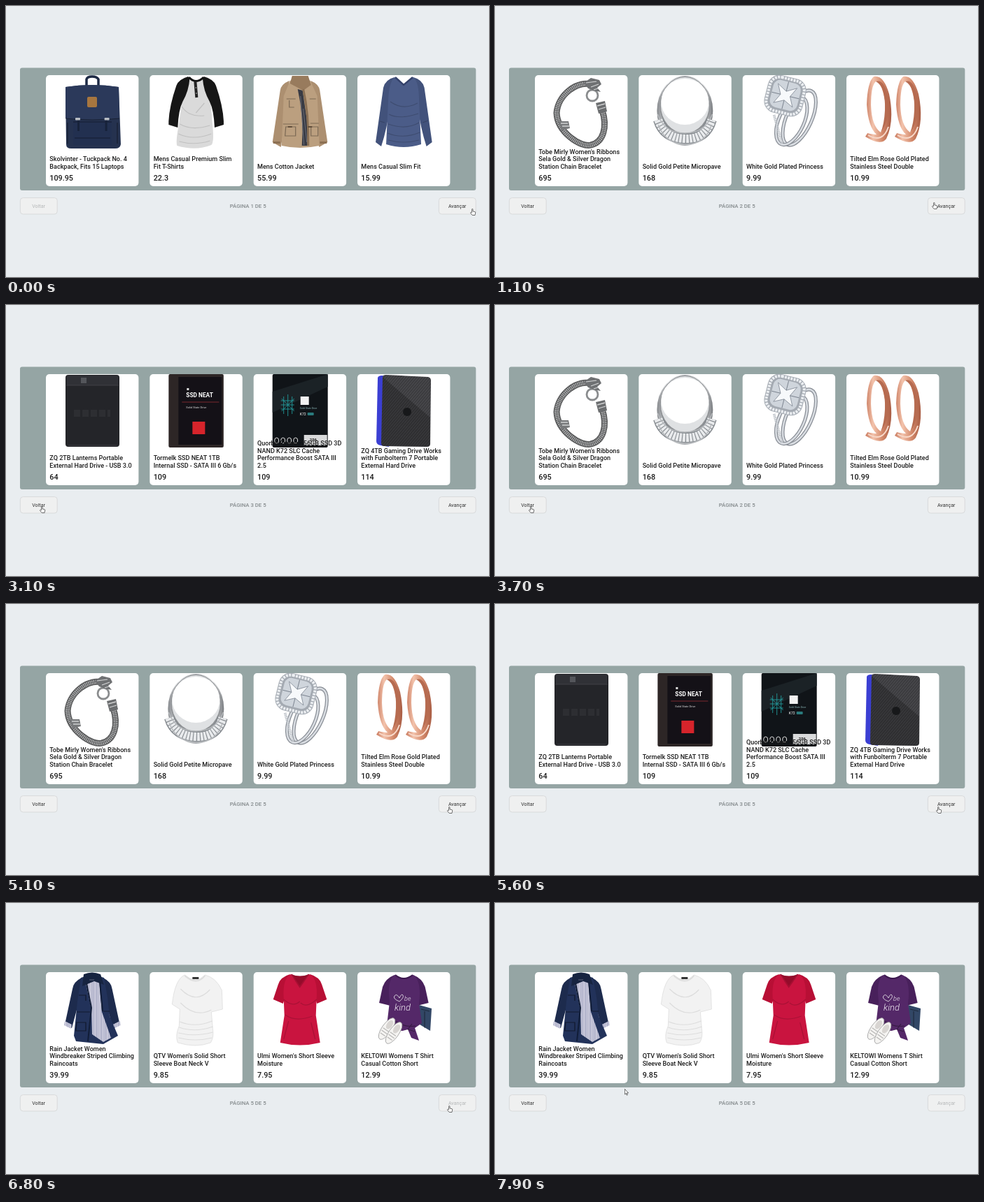
Write an HTML page that moves like this. It is 690 by 388 pixels and loops after 8 s.

```html
<!DOCTYPE html>
<html lang="pt">
<head>
<meta charset="utf-8">
<title>Carrossel de produtos</title>
<style>
  html, body { margin: 0; width: 100%; height: 100%; overflow: hidden; background: #e9edf0; }
  svg { display: block; overflow: hidden; font-family: Roboto, sans-serif; }
  .title, .price { font-weight: 500; fill: #1c1c1c; }
  .title { font-size: 9.05px; }
  .price { font-size: 10.8px; }
  .nav { font-size: 7.1px; fill: #333; text-anchor: middle; }
  .off { fill: #b5b7b8; }
  .count { font-size: 7.8px; font-weight: 500; fill: #858b8d; text-anchor: middle; }
  .pages, .cursor, .hand, .arrow { animation: 8s step-end infinite; }
  .pages { animation-name: pages; }
  .cursor { animation-name: move; }
  .hand { animation-name: hand; }
  .arrow { animation-name: arrow; }
  @keyframes pages {
    0% { transform: translateY(0); }
    12.5%, 46.25% { transform: translateY(-388px); }
    22.5%, 70% { transform: translateY(-776px); }
    76.25% { transform: translateY(-1164px); }
    85%, 100% { transform: translateY(-1552px); }
  }
  /* The pointer advances once every 100 ms while it travels. */
  @keyframes move {
    0% { transform: translate(663px, 290px); }
    1.25% { transform: translate(663px, 290px); animation-timing-function: steps(3, start); }
    5% { transform: translate(624px, 281px); }
    23.75% { transform: translate(624px, 281px); animation-timing-function: steps(4, start); }
    28.75% { transform: translate(196px, 238px); }
    32.5% { transform: translate(196px, 238px); animation-timing-function: steps(6, start); }
    40% { transform: translate(48px, 288px); }
    47.5% { transform: translate(48px, 288px); animation-timing-function: steps(6, start); }
    55% { transform: translate(441px, 305px); }
    57.5% { transform: translate(441px, 305px); animation-timing-function: steps(6, start); }
    65% { transform: translate(630px, 290px); }
    91.25% { transform: translate(630px, 290px); animation-timing-function: steps(3, start); }
    95% { transform: translate(219px, 265px); }
    98.75%, 100% { transform: translate(185px, 266px); }
  }
  @keyframes hand {
    0%, 37.5%, 63.75% { opacity: 1; }
    23.75%, 47.5%, 91.25%, 100% { opacity: 0; }
  }
  @keyframes arrow {
    0%, 37.5%, 63.75% { opacity: 0; }
    23.75%, 47.5%, 91.25%, 100% { opacity: 1; }
  }
</style>
</head>
<body>
<svg width="690" height="388" viewBox="0 0 690 388">
  <defs>
    <linearGradient id="silver">
      <stop offset="0" stop-color="#85888c"/><stop offset=".2" stop-color="#eceef0"/>
      <stop offset=".5" stop-color="#a6a9ad"/><stop offset=".8" stop-color="#f2f3f4"/>
      <stop offset="1" stop-color="#777a7e"/>
    </linearGradient>
    <linearGradient id="rose">
      <stop offset="0" stop-color="#c8795d"/><stop offset=".3" stop-color="#f3c3ac"/>
      <stop offset=".65" stop-color="#d48a6c"/><stop offset="1" stop-color="#a85c43"/>
    </linearGradient>
    <linearGradient id="sky" x2="0" y2="1">
      <stop offset="0" stop-color="#4d6fa6"/><stop offset=".35" stop-color="#c9c6d4"/>
      <stop offset=".5" stop-color="#7a6a86"/><stop offset="1" stop-color="#30482b"/>
    </linearGradient>
    <pattern id="weave" width="3" height="3" patternUnits="userSpaceOnUse" patternTransform="rotate(40)">
      <rect width="3" height="3" fill="#3b3b3e"/><rect width="1" height="3" fill="#4c4c50"/>
    </pattern>
    <pattern id="stripes" width="2.4" height="4" patternUnits="userSpaceOnUse">
      <rect width="2.4" height="4" fill="#d3d3e2"/><rect width=".8" height="4" fill="#8f93b4"/>
    </pattern>
  </defs>
  <rect width="690" height="388" fill="#e9edf0"/>
  <rect x="20" y="88.5" width="651.3" height="175.5" rx="3" fill="#95a5a4"/>
  <g fill="#eff0f0" stroke="#d3d5d6" stroke-width=".8">
    <rect x="20.4" y="274.6" width="52.8" height="23.4" rx="4"/>
    <rect x="618.4" y="274.6" width="52.8" height="23.4" rx="4"/>
  </g>
  <g class="pages" id="pages"></g>
  <g class="cursor" fill="#fff" stroke="#333" stroke-width=".7" stroke-linejoin="round">
    <path class="hand" d="M2.6 5.8V1.2Q2.6.4 3.3.4T4 1.2V4L7 4.6Q7.9 4.9 7.7 5.8L7 9.5H3.2L.6 6.4Q.5 5.2 1.4 5.3Z"/>
    <path class="arrow" d="M.4.4V8L2.1 6.5 3.3 9.2 4.4 8.7 3.2 6H5.6Z"/>
  </g>
</svg>
<script>
const path = (d, fill = 'none', stroke = 'none', w = 1, more = '') =>
  `<path d="${d}" fill="${fill}" stroke="${stroke}" stroke-width="${w}" ${more}/>`;
const rect = (x, y, w, h, fill, rx = 0, more = '') =>
  `<rect x="${x}" y="${y}" width="${w}" height="${h}" rx="${rx}" fill="${fill}" ${more}/>`;
const oval = (x, y, rx, ry, fill, more = '') =>
  `<ellipse cx="${x}" cy="${y}" rx="${rx}" ry="${ry}" fill="${fill}" ${more}/>`;
const text = (x, y, str, more = '') => `<text x="${x}" y="${y}" ${more}>${str}</text>`;
const label = (x, y, size, fill, str, weight = 400) =>
  text(x, y, str, `font-size="${size}" fill="${fill}" font-weight="${weight}"`);
const group = (transform, s) => `<g transform="${transform}">${s}</g>`;
const both = s => s + group('translate(132.6 0) scale(-1 1)', s);
const folds = (d, alpha = .2) => path(d, 'none', `rgba(0,0,0,${alpha})`, 1.2);

const backpack = () =>
  path('M58 16V6Q59 2 66 2T75 6V16', 'none', '#1c2944', 3.5) +
  path('M28 17Q66 11 104 17L107 99Q106 105 99 105H36Q29 105 29 99Z', '#25324f') +
  path('M28 17Q66 11 104 17L105 62Q66 66 28 62Z', '#2b395a') +
  rect(39, 66, 55, 34, '#223050', 2) +
  folds('M28 62Q66 66 105 62M39 67H94M41 90H92M31 68V98M102 68V98', .4) +
  both(rect(45, 64, 3, 16, '#17223a') + rect(42, 61, 7, 3.5, '#b9bec4', 1)) +
  rect(59, 31, 14, 15, '#a7763f', 2);

const raglan = () =>
  path('M54 3Q66 12 79 3Q81 24 87 38L90 74Q92 96 88 100Q66 109 39 101Q37 95 41 74L46 38Q53 22 54 3Z', '#dadada') +
  both(path('M55 2Q41 6 38 15Q28 44 27 66V71L40 75Q41 50 47 38Q56 22 57 5Z', '#161616')) +
  path('M56 3Q66 14 77 3', 'none', '#111', 3) + path('M65 9L67 32', 'none', '#222', 4) +
  oval(66, 18, .8, .8, '#ccc') + oval(66.6, 26, .8, .8, '#ccc') +
  folds('M46 45Q55 60 78 58M43 70Q60 80 86 72M41 84Q62 94 88 84M42 95Q65 101 86 94M78 40L66 54', .12);

const fieldJacket = () =>
  both(path('M51 8Q39 13 38 22L27 96L39 103L48 50Z', '#ac8f70') + rect(28, 95, 10, 3, '#8c7053')) +
  path('M52 8L66 3L81 8L91 30L94 101Q66 107 40 101L43 30Z', '#bb9f7f') +
  path('M55 1L78 1L82 14L71 22L52 12Z', '#987b5d') +
  path('M63 20L70 22L77 70L77 101L69 101Q72 60 63 20Z', '#393b44') +
  path('M67 30L72 100M71 48L76 96', 'none', '#777985', .8) +
  path('M71 20Q79 55 78 101', 'none', '#8b7054', 3) +
  folds('M47 34H60M80 34H89M42 70H64M81 69H93M46 74H60V87H45ZM82 74H92V87H82ZM51 36V46H58', .35) +
  both(rect(49, 73, 6, 2, '#604d3a'));

const sweater = () =>
  both(path('M53 3Q40 6 37 18L26 96L34 102Q42 78 47 43Z', '#42527b')) +
  path('M53 3L66 14L80 3Q88 10 88 36L91 99Q66 107 41 99L44 36Q45 10 53 3Z', '#4b5c88') +
  path('M54 3L66 14L79 3', 'none', '#33416a', 2.4) +
  folds('M47 38Q65 51 86 40M45 56Q60 64 87 55M44 70Q69 79 88 68M43 83Q65 92 89 82M44 93Q66 99 88 93M32 66L39 68M93 68L101 65', .18);

const bracelet = () => {
  const band = 'M84 14C61 6 33 28 31 54C32 82 66 104 80 100C98 96 104 74 96 50';
  return path(band, 'none', '#58595a', 9) + path(band, 'none', '#b9babb', 6, 'stroke-dasharray="1.3 1.2"') +
    path(band, 'none', '#6d6e70', .9) +
    oval(82, 29, 8, 8, 'none', 'stroke="#8a8c8e" stroke-width="2.8"') +
    path('M70 11L80 4L92 7L95 13L89 18L94 24L84 22L76 19Z', '#6f7173') +
    path('M73 11L88 9M80 17L91 13M84 21L90 19', 'none', '#d6d7d8', 1.2) +
    path('M34 66L48 66L50 76L38 79Z', '#77797b') + path('M87 40L100 37L103 52L91 55Z', '#6b6d6f') +
    path('M37 69H47M39 73H49M89 44L100 41M91 49L101 46', 'none', '#d0d1d2', 1.3);
};

const bandRing = () =>
  oval(66, 51, 40, 50, 'url(#silver)') +
  oval(66, 44, 36, 42, '#8f9295') + oval(66, 43, 34.5, 40, '#dfe1e3') +
  oval(66, 38, 34, 33, '#fff') +
  path('M28 64Q36 90 66 91T104 64', 'none', '#858a8f', 15) +
  path('M28 64Q36 90 66 91T104 64', 'none', '#e9ebed', 12, 'stroke-dasharray="3.6 1.1"') +
  path('M27 56Q37 83 66 83T105 56M28 71Q37 98 66 99T104 71', 'none', '#b7babd', 1.5);

const haloRing = () => {
  const hoop = (x, y, rx, ry) => oval(x, y, rx, ry, 'none', `transform="rotate(24 ${x} ${y})" stroke="#868b93" stroke-width="5"`) +
    oval(x, y, rx, ry, 'none', `transform="rotate(24 ${x} ${y})" stroke="#d9dde2" stroke-width="2.6"`);
  return hoop(81, 61, 18, 42) + hoop(70, 65, 18, 37) +
    path('M45 57L56 98', 'none', '#c0c5cb', 4, 'stroke-dasharray="1.6 .8"') +
    group('rotate(14 61 29)',
      rect(33, 2, 56, 55, '#a4aab2', 17) +
      rect(36, 5, 50, 49, 'none', 14, 'stroke="#eceff2" stroke-width="4" stroke-dasharray="3 1.3"') +
      rect(41, 9, 40, 40, '#cfd5dc', 10) +
      path('M47 15L61 23L75 15L68 29L75 43L61 36L47 43L54 29Z', '#f7f9fb', '#858d98', .8) +
      path('M41 29H54M68 29H81M61 9V23M61 36V49', 'none', '#7d8590', 1));
};

const roseHoops = () => {
  const hoop = path('M39 2Q53 -1 61 27Q69 66 57 91Q49 102 27 88L30 83Q39 85 43 85Q31 74 29 42Q30 10 39 2Z', 'url(#rose)') +
    path('M42 9Q50 8 55 37Q58 66 49 82Q36 73 35 43Q35 15 42 9Z', '#fff') +
    path('M42 9Q56 16 55 50Q54 70 49 82Q64 61 59 31Q54 5 42 9Z', '#b66b50') +
    path('M31 86Q52 98 60 74', 'none', '#f8dacb', 2);
  return hoop + group('translate(42 0)', hoop);
};

const plainDrive = () =>
  rect(28, 1, 77, 103, '#242529', 4) + rect(29.5, 2, 74, 14, '#303136', 3) +
  path('M29 16H104M32 102H101', 'none', '#44464b', .8) + rect(50, 5, 8, 8, '#54565b') +
  path('M40 56H92', 'none', '#2d2e32', 10, 'stroke-dasharray="9 3"');

const redDrive = () =>
  rect(27, 0, 78.5, 105, '#2d2626', 2) + rect(41, 4, 62, 97, '#141117') +
  rect(53, 20, 3, 3, '#ddd') + label(52, 33, 8.3, '#fff', 'SSD NEAT', 700) +
  path('M46 40H99', 'none', '#963036', .8) + label(52, 49, 4, '#ddd', 'Solid State Drive') +
  rect(61, 68, 18, 18, '#d6242b');

const tealDrive = () =>
  rect(27, 0, 79, 105, '#101418', 2) +
  path('M27 25L106 0V18L27 55Z', '#1b2226') +
  group('translate(49 44)', both('').replace(/./g, '') +
    path('M-10 -6H9M-10 0H9M-10 6H9M-6 -12V13M0 -15V16M6 -12V13M-9 -9L9 9M9 -9L-9 9', 'none', '#239a9c', .9)) +
  rect(67, 32, 12, 12, '#f2f2f2') + label(66, 50, 3.4, '#8cb8b9', 'Solid State Drive') +
  label(66, 59, 5.2, '#fff', 'K72') + rect(77, 55, 9, 4, '#2a7b7d', 1) +
  rect(72, 87, 33, 15, '#d9dadb') + label(80, 96, 6, '#222', '256', 700) +
  [33, 42, 51, 60].map(x => oval(x, 95, 3, 4, 'none', 'stroke="#ddd"')).join('');

const blueDrive = () =>
  path('M29 5Q30 2 35 2L50 4L45 104L33 102Q27 101 27 96Z', '#3b3fd3') +
  path('M36 4Q36 1 41 1L101 4Q105 5 105 9L104 100Q104 104 99 104L38 103Q34 103 34 99Z', 'url(#weave)') +
  path('M36 4L104 62L104 100Q104 104 99 104L38 103Q34 103 34 99Z', 'rgba(0,0,0,.22)') +
  oval(71, 54, 6, 6, '#17181a');

const monitor = () =>
  path('M60 84H73L75 99Q82 100 82 104H51Q51 100 58 99Z', '#111') +
  rect(26, 0, 80, 84, '#111', 1) + rect(28.5, 2, 75, 76, 'url(#sky)') +
  path('M28 15Q48 3 66 15T103 10V2H28Z', '#6b86ad') + oval(46, 14, 9, 5, '#fff3cf') +
  path('M28 36L43 21L56 34L75 17L103 36V49H28Z', '#5b536f') +
  path('M28 39Q50 29 66 42T103 37V78H28Z', '#45632e') +
  path('M28 50L51 46L64 66L84 48L103 56V78H28Z', '#28391f') +
  path('M61 41Q47 51 62 54T61 65Q49 69 44 78H86Q72 71 71 62T67 49Z', '#dce1e6') +
  path('M80 39Q91 33 101 43M31 43L43 41', 'none', '#84963c', 4);

const curvedMonitor = () =>
  path('M59 84L72 74L82 83L87 88L66 84L60 104L52 93L80 88', 'none', '#26272a', 2.5) +
  path('M27 1Q66 10 105.5 15Q107 48 104 72Q66 75 28 91Z', '#0d1016') +
  path('M29 4Q66 12 103.5 17Q105 47 102 69Q66 73 30 86Z', '#151d25') +
  path('M29 24L68 46L102 33V69Q66 73 30 86Z', '#1b2b34') +
  path('M57 44Q64 37 69 48L72 64L79 75H52L54 59Z', '#05080b') +
  path('M60 47L66 50M55 61L64 59M68 57L73 65', 'none', '#758891', 1) +
  group('translate(76 39) rotate(7)', ['QLED', 'GAMING', 'MONITOR'].map((s, i) => label(0, i * 6.5, 5.8, '#fff', s, 700)).join(''));

const hooded = (fill, dark, light) =>
  both(path('M50 16Q39 18 37 30L27 92L37 101Q44 79 47 50Z', fill)) +
  path('M48 16L66 9L85 16L88 48L94 99Q66 108 39 99L45 48Z', fill) +
  path('M50 18Q48 4 60 1H73Q84 4 83 18Q75 25 66 24T50 18Z', dark) +
  path('M55 16Q57 5 66 5T78 16L67 23Z', light) +
  folds('M66 21V102M45 47Q55 57 65 51M88 47Q77 57 67 51M40 94Q66 101 93 94M31 71L42 74M102 71L91 74M49 73L45 86M83 73L88 86', .45);

const snowJacket = () => hooded('#421a6d', '#30114f', '#582c85') +
  rect(75, 34, 8, 2, '#b9a8cc') + path('M67 24V102', 'none', '#2b1046', 1.6) +
  both(path('M27 89L39 93', 'none', '#251039', 3));

const bikerJacket = () => hooded('#303236', '#1c1d1f', '#43454a') +
  path('M55 21L66 40L78 21L85 36L69 52L66 101L63 52L48 36Z', '#222327', '#696b70', .7) +
  folds('M33 48L46 53M99 48L87 53M29 82L40 87M104 82L92 87', .7) +
  path('M72 49L66 101M48 63L56 75M84 63L78 75', 'none', '#85878b', .8);

const raincoat = () =>
  both(path('M51 8Q39 14 38 24L27 75L37 80L47 43Z', '#1d2b4d') + path('M27 70L37 75L36 81L26 76Z', 'url(#stripes)')) +
  path('M50 8L66 3L83 8L88 36L91 63L103 91L82 103L43 99L40 91L45 42Z', '#22325a') +
  path('M56 12L76 11L80 57L93 94L82 100L66 89L65 54Z', 'url(#stripes)') +
  path('M54 3Q66 -2 78 3L83 18L69 13L52 20Z', '#172440') +
  rect(62, 10, 7, 2, '#39425c') +
  path('M58 16L65 51L60 99', 'none', '#111d37', 2) + path('M77 14L81 56', 'none', '#111d37', 2) +
  folds('M44 57H63M82 56H91M44 72H57V84H43ZM47 33H57V41', .5);

const whiteTee = () =>
  path('M50 4Q66 18 79 4Q95 8 103 26L104 53L88 57L90 81Q92 93 87 101Q66 109 40 101Q36 91 42 77L43 53L32 46Q36 10 50 4Z', '#f2f2f2', '#dedede', .8) +
  path('M50 5Q67 20 79 5', 'none', '#ddd', 2) + rect(61, 7, 9, 3, '#333') +
  folds('M44 24Q66 47 86 25M44 44Q65 66 88 54M43 71Q65 80 89 70M42 79Q65 87 90 78M41 87Q65 93 90 86M41 94Q65 100 89 94', .09);

const redTee = () =>
  both(path('M52 3Q38 7 35 18L28 39L42 45L48 28Z', '#b80f35')) +
  path('M53 3L66 21L80 3Q92 9 90 38L89 62L95 101Q66 108 38 101L44 62L43 38Q41 9 53 3Z', '#c9143f') +
  path('M54 3L66 21L79 3Q66 8 54 3Z', '#940c2b') + path('M54 3L66 21L79 3', 'none', '#a60f32', 2) +
  folds('M43 39Q56 51 66 42M90 39Q76 52 67 44M45 61Q60 72 84 63M50 70L43 96M82 72L88 96', .16);

const knottedTee = () => {
  const shoe = group('rotate(35 42 81)', oval(42, 81, 7, 18, '#f5f4f2', 'stroke="#aaa" stroke-width=".9"') +
    oval(42, 74, 4, 7, '#d8d5d2') + folds('M37 83H47M37 87H47M38 91H46', .25));
  return path('M88 47L106 52L104 84L89 75Z', '#324766') + folds('M91 53L103 56M96 56V80', .4) +
    both(path('M53 4Q40 9 36 21L31 44L47 48L50 30Z', '#48205b')) +
    path('M53 4Q66 13 80 4Q92 13 88 45L92 73L82 80L88 98L77 94L72 82Q56 88 42 76L46 42Q42 12 53 4Z', '#542868') +
    path('M54 4Q66 14 79 4', 'none', '#3b184d', 2) +
    path('M60 37Q56 30 53 34T60 42Q67 36 65 33T60 37Z', 'none', '#eee', .8) +
    text(67, 41, 'be', 'font-size="9" fill="#f1ebf3" font-weight="300" font-style="italic"') +
    text(53, 55, 'kind', 'font-size="13" fill="#f1ebf3" font-weight="300" font-style="italic"') +
    folds('M48 65Q64 80 83 77M78 74L72 82L82 85', .35) + shoe + group('translate(10 6)', shoe);
};

const pages = [
  [[backpack, 'Skolvinter - Tuckpack No. 4|Backpack, Fits 15 Laptops', '109.95'],
   [raglan, 'Mens Casual Premium Slim|Fit T-Shirts', '22.3'],
   [fieldJacket, 'Mens Cotton Jacket', '55.99'],
   [sweater, 'Mens Casual Slim Fit', '15.99']],
  [[bracelet, "Tobe Mirly Women's Ribbons|Sela Gold &amp; Silver Dragon|Station Chain Bracelet", '695'],
   [bandRing, 'Solid Gold Petite Micropave', '168'],
   [haloRing, 'White Gold Plated Princess', '9.99'],
   [roseHoops, 'Tilted Elm Rose Gold Plated|Stainless Steel Double', '10.99']],
  [[plainDrive, 'ZQ 2TB Lanterns Portable|External Hard Drive - USB 3.0', '64'],
   [redDrive, 'Tormelk SSD NEAT 1TB|Internal SSD - SATA III 6 Gb/s', '109'],
   [tealDrive, 'Quorbit Ember 256GB SSD 3D|NAND K72 SLC Cache|Performance Boost SATA III|2.5', '109'],
   [blueDrive, 'ZQ 4TB Gaming Drive Works|with Funbolterm 7 Portable|External Hard Drive', '114']],
  [[monitor, 'Ovel RK417T bi 21.5 inches|Full HD (1920 x 1080) IPS|Ultra-Thin', '599'],
   [curvedMonitor, 'Mondrev 49-Inch VTK31|144Hz Curved Gaming|Monitor (RV49TK31BPQWLE)|– Super Ultrawide Screen|QLED', '999.99'],
   [snowJacket, "NORVELUMIKA Women's 3-in-1|Snowboard Jacket Winter|Coats", '56.99'],
   [bikerJacket, "Fern and Dusk Women's|Removable Hooded Faux|Leather Moto Biker Jacket", '29.95']],
  [[raincoat, 'Rain Jacket Women|Windbreaker Striped Climbing|Raincoats', '39.99'],
   [whiteTee, "QTV Women's Solid Short|Sleeve Boat Neck V", '9.85'],
   [redTee, "Ulmi Women's Short Sleeve|Moisture", '7.95'],
   [knottedTee, 'KELTOWI Womens T Shirt|Casual Cotton Short', '12.99']]
];

const card = ([draw, title, price], i) => {
  const lines = title.split('|');
  return group(`translate(${57 + 148.35 * i} 99)`,
    rect(0, 0, 132.4, 159, '#fff', 5) + draw() +
    lines.map((s, n) => text(5.3, 133.7 - 10.6 * (lines.length - 1 - n), s, 'class="title"')).join('') +
    text(5.3, 151.4, price, 'class="price"'));
};

document.getElementById('pages').innerHTML = pages.map((cards, n) =>
  group(`translate(0 ${388 * n})`,
    cards.map(card).join('') +
    text(46.6, 288.8, 'Voltar', `class="nav ${n === 0 ? 'off' : ''}"`) +
    text(345.7, 289, `PÁGINA ${n + 1} DE 5`, 'class="count"') +
    text(644.7, 288.8, 'Avançar', `class="nav ${n === 4 ? 'off' : ''}"`))
).join('');
</script>
</body>
</html>
```
